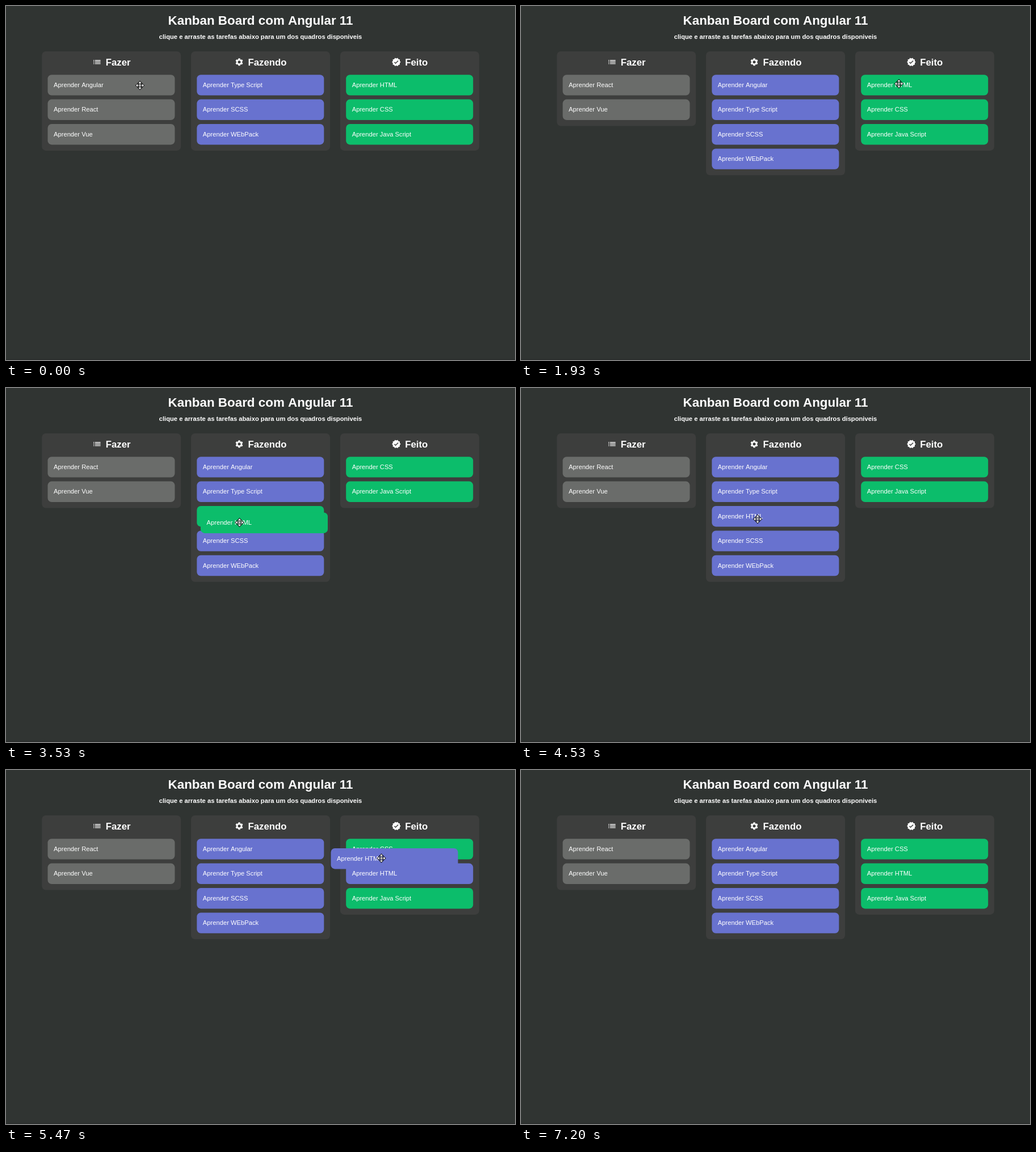
Animation, 897 px wide and 624 px high, one loop 7670 ms. Source, as an HTML page with a canvas:

```html
<!DOCTYPE html>
<html lang="pt">
<head>
<meta charset="utf-8">
<title>Kanban Board</title>
<style>
  html, body { margin: 0; width: 100%; height: 100%; overflow: hidden; background: #303432; }
  canvas { display: block; }
</style>
</head>
<body>
<canvas id="stage" width="897" height="624"></canvas>
<script>
const ctx = document.getElementById('stage').getContext('2d');
const LOOP = 7670, STEPS_PER_MS = 0.015;
const CARD = { x: 73.5, y: 121.2, w: 224, h: 36.4, pitch: 43.4 };
const COLUMN_PITCH = 262.85;

const columns = [
  { title: 'Fazer', icon: listIcon, color: '#6a6c6a', cards: ['Angular', 'React', 'Vue'] },
  { title: 'Fazendo', icon: gearIcon, color: '#6872cf', cards: ['Type Script', 'SCSS', 'WEbPack'] },
  { title: 'Feito', icon: badgeIcon, color: '#0cbd6b', cards: ['HTML', 'CSS', 'Java Script'] }
];

// Pointer path: step, x, y
const path = [
  [0, 236, 140], [6, 236, 140], [13, 438.5, 154], [21, 438.5, 154],
  [29, 666, 137], [30, 666, 137], [31, 668.7, 137.7], [33, 673, 139], [40, 492, 146],
  [42, 492, 146], [52, 412.5, 236], [53, 411.5, 237], [54, 411.5, 239], [57, 411, 238],
  [62, 411, 238], [65, 417, 231], [68, 417, 231], [77, 644, 172],
  [80, 644, 172], [81, 653.5, 160.5], [82, 661.5, 155.5], [85, 668, 141.5], [90, 676, 193],
  [100, 676, 193], [108, 75, 630]
];

// Grab and drop steps, and where the pointer holds the card
const drags = [
  { name: 'Angular', from: 0, grab: 7, drop: 21, dx: 162.5, dy: 18.8 },
  { name: 'HTML', from: 2, grab: 32, drop: 55, dx: 69.5, dy: 16.5 },
  { name: 'HTML', from: 1, grab: 69, drop: 96, dx: 81, dy: 22.5 }
];

function pointerAt(step) {
  const next = path.findIndex(p => p[0] > step);
  if (next < 0) return path[path.length - 1].slice(1);
  const a = path[Math.max(next - 1, 0)], b = path[next];
  const u = Math.max(0, (step - a[0]) / (b[0] - a[0]));
  const e = u * u * (3 - 2 * u);
  return [a[1] + (b[1] - a[1]) * e, a[2] + (b[2] - a[2]) * e];
}

function boardAt(step) {
  const lists = columns.map(c => c.cards.map(name => ({ name, color: c.color })));
  let preview = null;
  for (const d of drags) {
    if (step < d.grab) break;
    // The page trails the pointer by one step
    const [x, y] = pointerAt(Math.min(step, d.drop) - 1);
    const target = x < 317 ? 0 : x < 580 ? 1 : 2;
    const slot = Math.floor((y - 114) / CARD.pitch);
    const held = step < d.drop;
    const card = { name: d.name, color: columns[held ? d.from : target].color };
    lists[d.from] = lists[d.from].filter(c => c.name !== d.name);
    lists[target].splice(slot, 0, card);
    if (held) preview = { ...card, x: x - d.dx, y: y - d.dy };
  }
  return { lists, preview };
}

function box(x, y, w, h, r, color) {
  ctx.fillStyle = color;
  ctx.beginPath();
  ctx.roundRect(x, y, w, h, r);
  ctx.fill();
}

function text(str, x, y, size, weight = 'bold', align = 'left') {
  ctx.font = `${weight} ${size}px "Liberation Sans", Arial, sans-serif`;
  ctx.textAlign = align;
  ctx.fillStyle = '#fff';
  ctx.fillText(str, x, y);
}

function drawCard({ name, color }, x, y) {
  box(x, y, CARD.w, CARD.h, 7, color);
  text('Aprender ' + name, x + 10.5, Math.round(y + 21.7), 11.2, 'normal');
}

// Icons are drawn on a 24-unit grid centred on the origin
function polar(points) {
  const p = new Path2D();
  points.forEach(([a, r]) => p.lineTo(r * Math.cos(a), r * Math.sin(a)));
  p.closePath();
  return p;
}

function listIcon() {
  const p = new Path2D();
  for (const y of [-5, -1, 3]) {
    p.rect(-9, y, 2, 2);
    p.rect(-5, y, 14, 2);
  }
  return p;
}

function gearIcon() {
  const rim = [[-.39, 7.2], [-.22, 9.6], [.22, 9.6], [.39, 7.2]];
  const p = polar(Array.from({ length: 24 }, (_, i) => {
    const [a, r] = rim[i % 4];
    return [a + Math.PI * (.5 + Math.floor(i / 4) / 3), r];
  }));
  p.moveTo(3.6, 0);
  p.arc(0, 0, 3.6, 0, 7);
  return p;
}

function badgeIcon() {
  const p = polar(Array.from({ length: 20 }, (_, i) => [i * Math.PI / 10, i % 2 ? 9 : 11]));
  p.addPath(new Path2D('M-1.9 4.7l-3.8-3.8 1.5-1.5 2.3 2.3 5.9-5.8 1.5 1.5z'));
  return p;
}

function drawColumn(column, i, cards) {
  const left = i * COLUMN_PITCH, middle = left + 185.7;
  box(left + 63.2, 80, 245, 44.7 + cards.length * CARD.pitch, 7, '#3d3e3d');
  ctx.font = 'bold 16.8px "Liberation Sans", Arial, sans-serif';
  const start = middle - (23.8 + ctx.measureText(column.title).width) / 2;
  text(column.title, start + 23.8, 104.5, 16.8);
  ctx.save();
  ctx.translate(start + 8.4, 98.8);
  ctx.scale(.7, .7);
  ctx.fill(column.icon(), 'evenodd');
  ctx.restore();
  cards.forEach((card, n) => drawCard(card, left + CARD.x, CARD.y + n * CARD.pitch));
}

const arrow = new Path2D('M0 0V12.5L2.9 9.8L4.8 14L6.8 13.1L5 9H9z');
const mover = new Path2D();
for (let i = 0; i < 4; i++) {
  const arm = new Path2D('M-.6 0V-4.2H-2.7L0 -7L2.7 -4.2H.6V0z');
  mover.addPath(arm, new DOMMatrix().rotate(i * 90));
}

function drawPointer([x, y], { lists, preview }) {
  const col = Math.floor((x - CARD.x) / COLUMN_PITCH);
  const row = Math.floor((y - CARD.y) / CARD.pitch);
  const over = lists[col] && lists[col][row] &&
    x - CARD.x - col * COLUMN_PITCH < CARD.w &&
    y - CARD.y - row * CARD.pitch < CARD.h;
  const shape = preview || over ? mover : arrow;
  ctx.save();
  ctx.translate(x, y);
  ctx.strokeStyle = '#000';
  ctx.lineWidth = 1.6;
  ctx.stroke(shape);
  ctx.fillStyle = '#fff';
  ctx.fill(shape);
  ctx.restore();
}

function draw(time) {
  const step = Math.floor((time % LOOP + 4) * STEPS_PER_MS);
  const board = boardAt(step);
  ctx.fillStyle = '#303432';
  ctx.fillRect(0, 0, 897, 624);
  ctx.fillStyle = '#2b2e2d';
  ctx.fillRect(0, 622, 897, 2);
  text('Kanban Board com Angular 11', 448.5, 33, 22.4, 'bold', 'center');
  text('clique e arraste as tarefas abaixo para um dos quadros disponiveis', 448.5, 58, 11.2, 'bold', 'center');
  columns.forEach((column, i) => drawColumn(column, i, board.lists[i]));
  if (board.preview) drawCard(board.preview, board.preview.x, board.preview.y);
  if (step < 108) drawPointer(pointerAt(step), board);
}

const start = performance.now();
(function tick() {
  draw(performance.now() - start);
  requestAnimationFrame(tick);
})();
</script>
</body>
</html>
```
